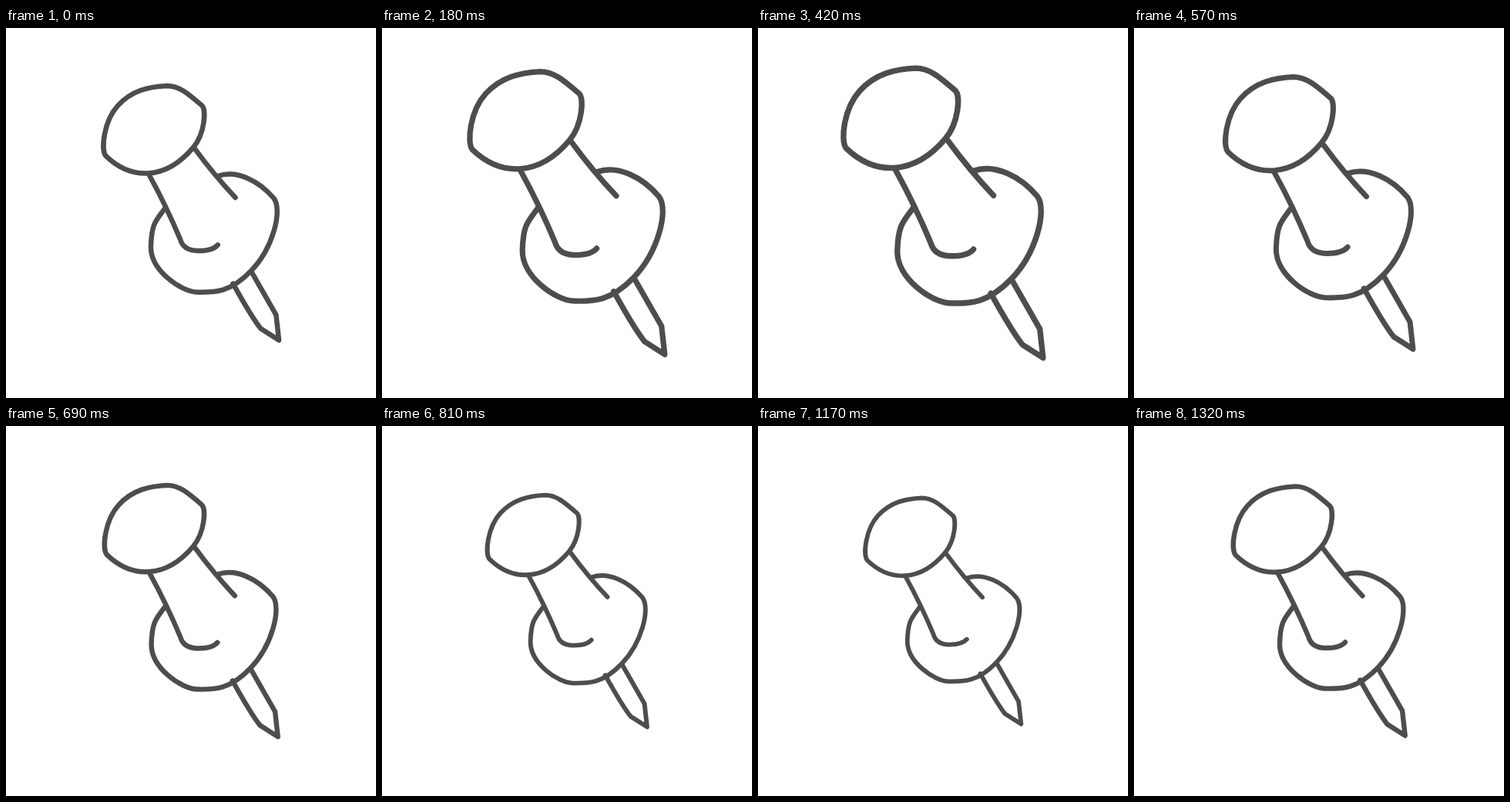
Recreate the animation shown at these times as an HTML page with a canvas. Size 480 px wide and 480 px high, loop 1350 ms.

```html
<!DOCTYPE html>
<html lang="en">
<head>
<meta charset="utf-8">
<title>Push pin</title>
<style>
  html, body { margin: 0; width: 100%; height: 100%; overflow: hidden; background: #fff; }
  canvas { display: block; width: 480px; height: 480px; }
</style>
</head>
<body>
<canvas id="stage" width="480" height="480"></canvas>
<script>
const ctx = document.getElementById('stage').getContext('2d');
const LOOP = 1350;
const CENTER = 240;
const SWING = 0.15;

// Outlines as a few curves each, at scale 1
const head = new Path2D(`M209 75 C224 75 235 84 254 100.5 C260 106 258 137 243 155
  S208 187 185 188.5 S144 180 129.5 166 C123 157 127 121 145 101 S186 76 209 75 Z`);
const disc = new Path2D(`M275 192 C299 183.5 328 198 347.5 221 C359 237 346 286 318 315
  S270 343 248.5 342.7 S187 314 188 283 S195 250 206.5 233.5`);
const neck = new Path2D(`M186 191 Q208 231 226 274 Q230 288.8 249 289 T274.7 281.3
  M244 155.5 Q270 191 297.5 220`);
const needle = new Path2D('M294.5 331.5 Q318 374 330.5 390 L354 405 L350.3 372 L318 315.5');

function draw(time) {
  const scale = 1 + SWING * Math.sin(time / LOOP * Math.PI * 2);
  ctx.setTransform(1, 0, 0, 1, 0, 0);
  ctx.fillStyle = '#fff';
  ctx.fillRect(0, 0, 480, 480);
  ctx.translate(CENTER, CENTER);
  ctx.scale(scale, scale);
  ctx.translate(-CENTER, -CENTER);
  ctx.strokeStyle = '#4d4d4d';
  ctx.lineWidth = 6.5;
  ctx.lineCap = ctx.lineJoin = 'round';
  for (const part of [needle, disc, neck, head]) ctx.stroke(part);
}

function tick() {
  draw(performance.now() % LOOP);
  requestAnimationFrame(tick);
}
tick();
</script>
</body>
</html>
```
